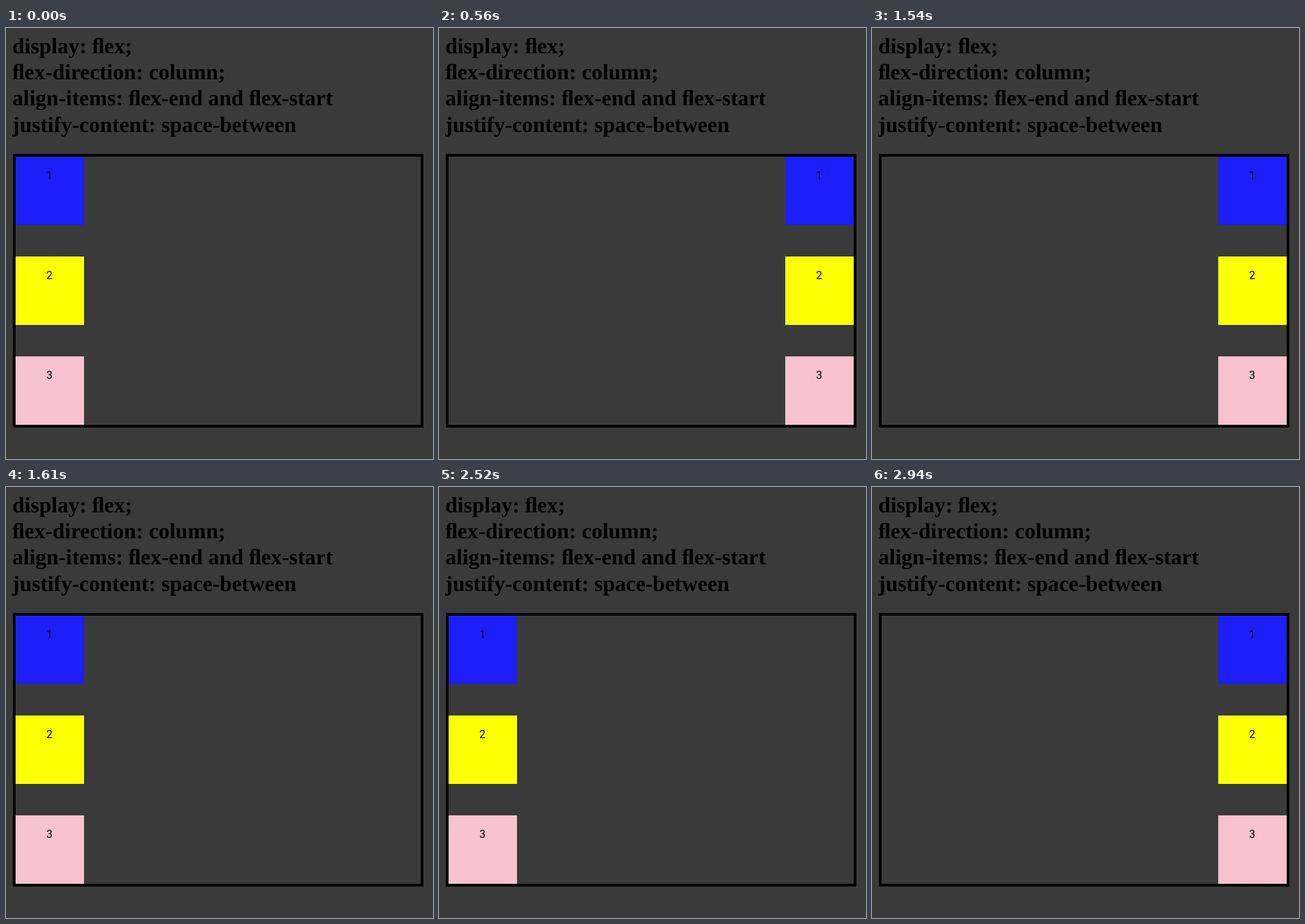
An HTML page that plays this animation: 624x630 px, repeating every 3.5 s.

```html
<!DOCTYPE html>
<html lang="en">
<head>
<meta charset="utf-8">
<title>Flex column alignment</title>
<style>
  html, body { margin: 0; width: 100%; height: 100%; overflow: hidden; background: #3a3a3a; }
  svg { display: block; }
  .title { font: bold 32px "Liberation Serif", "Times New Roman", serif; text-rendering: geometricPrecision; }
  .item { font: 16px Roboto, "Liberation Sans", sans-serif; text-anchor: middle; }
</style>
</head>
<body>
<svg width="624" height="630" viewBox="0 0 624 630">
  <!-- The fl pairs are set as ligatures. -->
  <g class="title">
    <text x="9.3" y="37">display: &#xfb02;ex;</text>
    <text x="9.3" y="75">&#xfb02;ex-direction: column;</text>
    <text x="9.3" y="113">align-items: &#xfb02;ex-end and &#xfb02;ex-start</text>
    <text x="9.3" y="152">justify-content: space-between</text>
  </g>
  <rect x="12" y="186" width="596" height="396" fill="none" stroke="#000" stroke-width="4"/>
  <g id="items" class="item">
    <rect x="14.5" y="188.5" width="99" height="99" fill="#1c1ff9" stroke="#2222c8"/>
    <text x="63.5" y="221">1</text>
    <rect x="14.5" y="334.5" width="99" height="99" fill="#fdff03" stroke="#fcff38"/>
    <text x="63.5" y="367">2</text>
    <rect x="14.5" y="480.5" width="99" height="99" fill="#f8c2d0" stroke="#f6c4d0"/>
    <text x="63.5" y="513">3</text>
  </g>
</svg>
<script>
  const LOOP = 3500, FIRST = 560, HOLD = 1050, SHIFT = 492;
  const items = document.getElementById("items");
  const start = performance.now();

  function draw(now) {
    const t = Math.max(0, now - start) % LOOP;
    // The column flips sides at 560, 1610 and 2660 ms.
    const atEnd = t >= FIRST && Math.floor((t - FIRST) / HOLD) % 2 === 0;
    items.setAttribute("transform", `translate(${atEnd ? SHIFT : 0})`);
    requestAnimationFrame(draw);
  }
  draw(start);
</script>
</body>
</html>
```
